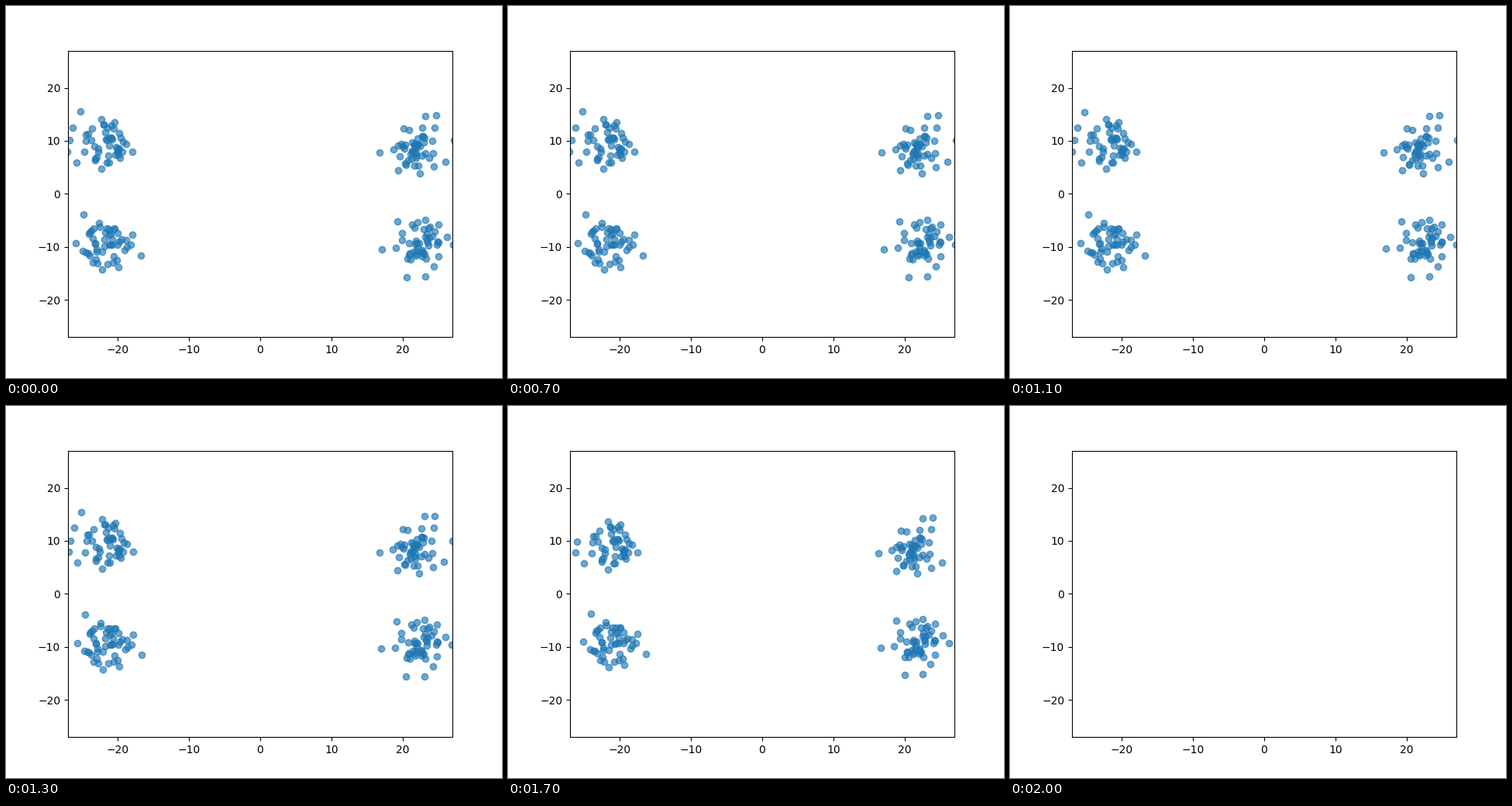
Animation of 640 by 480 pixels, one loop 2.1 s. Source, as a matplotlib script:

```python
import numpy as np
import matplotlib.pyplot as plt
from matplotlib.animation import FuncAnimation

FRAMES, INTERVAL = 21, 100
LIMIT = 27
CORE_SIZE = 40
COLLAPSE = 17  # step at which the outermost points start to drop out

rng = np.random.default_rng(12)

# Each cluster: centre of its core, then the outlying points around it.
CLUSTERS = [
    ((-21.8, 9.4), [
        (-25.3, 15.5), (-26.3, 12.5), (-26.8, 10.1), (-27.1, 8),
        (-25.8, 5.9), (-22.3, 4.7), (-24.7, 7.9), (-22.3, 14.1),
        (-20.5, 13.5), (-18, 8)]),
    ((21.6, 8.9), [
        (16.8, 7.8), (19.4, 4.4), (22.4, 3.9), (23.2, 14.7),
        (24.7, 14.8), (24.5, 12.5), (27.2, 10.1), (26, 6.1),
        (24.4, 5.1), (20.1, 12.3)]),
    ((-21.7, -9.6), [
        (-24.8, -3.9), (-22.6, -5.5), (-25.9, -9.3), (-24.9, -10.8),
        (-18, -7.7), (-16.8, -11.6), (-19.9, -13.8), (-22.2, -14.3),
        (-23.5, -12.9), (-18.2, -9.6)]),
    ((21.9, -8.9), [
        (19.3, -5.2), (23.2, -4.9), (25, -5.8), (26.2, -8.1),
        (27.1, -9.6), (24.4, -13.7), (23.2, -15.6), (20.6, -15.7),
        (17.1, -10.4), (25, -11.8)]),
]


def core(centre):
    """Random points filling an ellipse, denser in the middle."""
    angle = rng.uniform(0, 2 * np.pi, CORE_SIZE)
    radius = rng.uniform(0, 1, CORE_SIZE) ** 0.6
    offset = np.column_stack([3.2 * np.cos(angle), 3.8 * np.sin(angle)])
    return np.array(centre) + radius[:, None] * offset


start = np.vstack([np.vstack([core(c), loose]) for c, loose in CLUSTERS])
dist = np.hypot(start[:, 0], start[:, 1])

fig, ax = plt.subplots(figsize=(6.4, 4.8), dpi=100)
ax.set_xlim(-LIMIT, LIMIT)
ax.set_ylim(-LIMIT, LIMIT)
dots, = ax.plot([], [], "o", color="#1f77b4", alpha=0.65)


def update(n):
    k = n - COLLAPSE
    shrink = (0.0167 + 0.0005 * dist) * 1.5 ** k
    pos = start * (1 - shrink)[:, None]
    if k >= 0:
        pos = pos[dist < 28.9 - 3.1 * k - 0.15 * k * k]
    dots.set_data(pos[:, 0], pos[:, 1])
    return dots,


anim = FuncAnimation(fig, update, frames=FRAMES, interval=INTERVAL,
                     repeat=True, repeat_delay=0)
plt.show()
```
